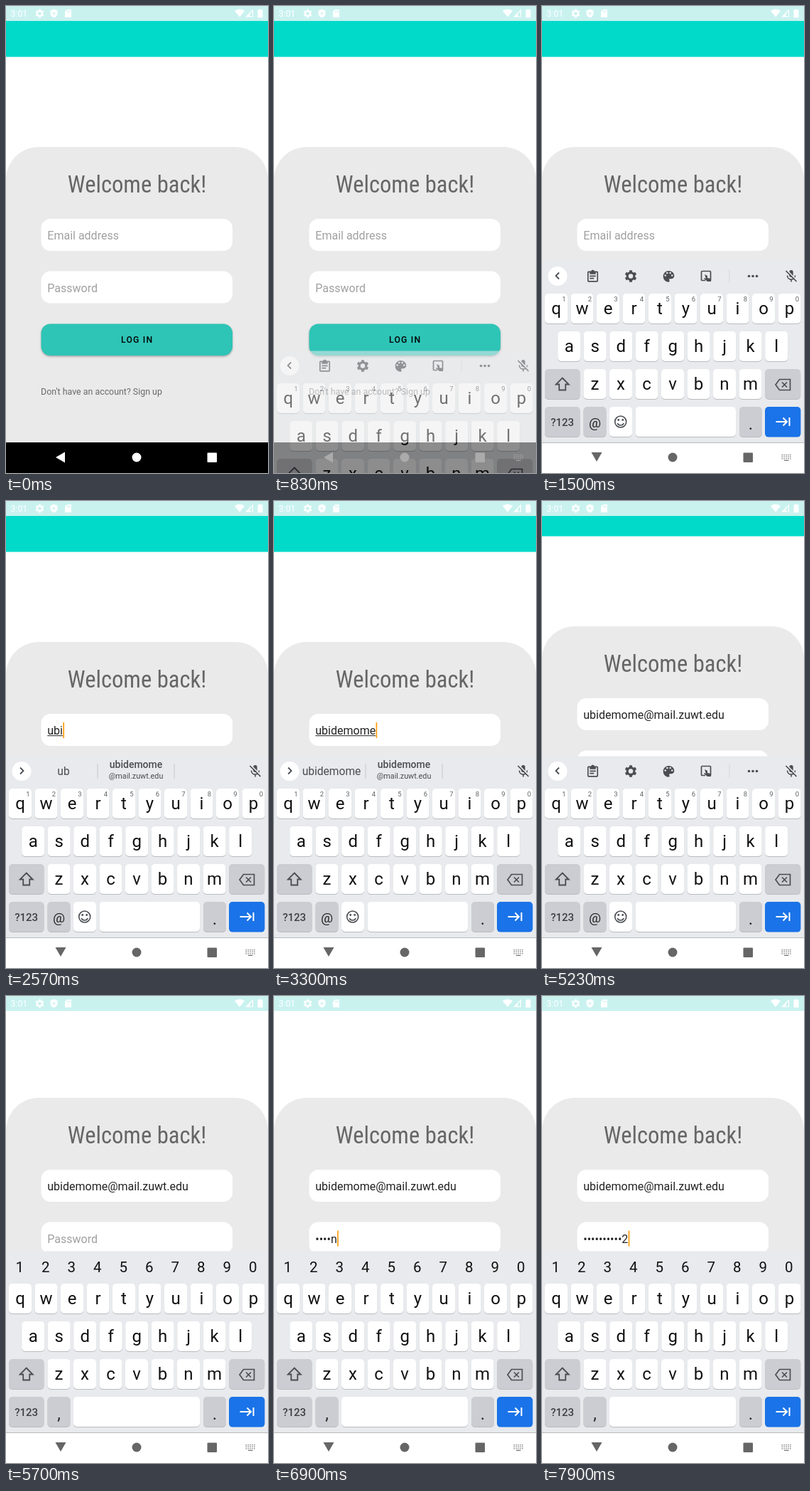
These frames come from a looping animation (369 by 656 pixels, 8 s). An HTML page with a canvas:

```html
<!DOCTYPE html>
<html lang="en">
<head>
<meta charset="utf-8">
<title>Login</title>
<style>
  html, body { margin: 0; width: 100%; height: 100%; overflow: hidden; background: #fff; }
  canvas { display: block; width: 369px; height: 656px; }
</style>
</head>
<body>
<canvas id="stage"></canvas>
<script>
const W = 369, H = 656, LOOP = 8000;
const USER = 'ubidemome', DOMAIN = '@mail.zuwt.edu', SECRET = 'habonedu582';
const SECRET_TIMES = [6370, 6500, 6570, 6700, 6900, 6970, 7170, 7300, 7630, 7770, 7900];
const SANS = 'Roboto, "Open Sans", sans-serif';
const INK = '#4a4d51', PITCH = 36.5;

const dpr = window.devicePixelRatio || 1;
const setup = canvas => {
  canvas.width = W * dpr;
  canvas.height = H * dpr;
  const g = canvas.getContext('2d');
  g.scale(dpr, dpr);
  return g;
};
const main = setup(document.getElementById('stage'));
const layer = setup(document.createElement('canvas'));
let c = main;

const clamp = x => Math.min(1, Math.max(0, x));
const within = (t, a, b) => t >= a && t < b;
const held = (t, start, step) => start + step * Math.floor((t - start) / step);

function box(x, y, w, h, r, fill) {
  c.beginPath();
  c.roundRect(x, y, w, h, r);
  c.fillStyle = fill;
  c.fill();
}
function disc(x, y, r, fill) {
  c.beginPath();
  c.arc(x, y, r, 0, 7);
  c.fillStyle = fill;
  c.fill();
}
function text(s, x, y, size, fill, align = 'left', weight = 400) {
  c.font = `${weight} ${size}px ${SANS}`;
  c.textAlign = align;
  c.fillStyle = fill;
  c.fillText(s, x, y);
}
function shape(d, x, y, scale, fill) {
  c.save();
  c.translate(x, y);
  c.scale(scale, scale);
  c.fillStyle = fill;
  c.fill(new Path2D(d), 'evenodd');
  c.restore();
}
function line(d, x, y, color, width = 1.8) {
  c.save();
  c.translate(x, y);
  c.strokeStyle = color;
  c.lineWidth = width;
  c.stroke(new Path2D(d));
  c.restore();
}
function gear(x, y, r, fill) {
  c.save();
  c.translate(x, y);
  c.strokeStyle = fill;
  c.lineWidth = r * .38;
  c.beginPath();
  c.arc(0, 0, r * .58, 0, 7);
  c.stroke();
  for (let i = 0; i < 6; i++) {
    c.rotate(Math.PI / 3);
    box(-r * .24, -r, r * .48, r * .36, r * .08, fill);
  }
  c.restore();
}

// Status bar

function statusBar() {
  c.fillStyle = '#c9f2ef';
  c.fillRect(0, 0, W, 21);
  text('3:01', 6.5, 15, 12.3, '#fff');
  gear(47.5, 10.5, 6, '#fff');
  shape('M0-6L5-4V0C5 3 3 5 0 6C-3 5-5 3-5 0V-4ZM0-2.6L.8-.8 2.6 0 .8.8 0 2.6-.8.8-2.6 0-.8-.8Z', 67.5, 10.5, 1, '#fff');
  shape('M-1.5-5.5H4.5V5.5H-4.5V-2.5ZM-1.5-3.8V-1.6H-.5V-3.8ZM.5-3.8V-1.6H1.5V-3.8ZM2.4-3.8V-1.6H3.4V-3.8Z', 87.5, 10.5, 1, '#fff');
  shape('M0 5.5L-7-3C-3-6.4 3-6.4 7-3Z', 329, 10, 1, '#fff');
  shape('M5-5.5V5.5H-6ZM3.8-2.6L.5.8V4.4H3.8Z', 343, 10, 1, '#fff');
  shape('M-1.5-6H1.5V-5H3.5V5.7H-3.5V-5H-1.5Z', 358, 10.5, 1, '#fff');
}

// Login form

function title() {
  const s = 'Welcome back!';
  const face = size => `condensed ${size}px "Roboto Condensed", Roboto, sans-serif`;
  c.font = face(34);
  const size = 34 * Math.min(1, 195.5 / c.measureText(s).width);
  c.font = face(size);
  c.textAlign = 'center';
  c.fillStyle = '#666';
  c.fillText(s, 184.5, 262);
}

function field(y, hint, value, caret, underline) {
  box(49.5, y, 269.5, 45, 13, '#fff');
  const base = y + 29, x = 58.3;
  text(value || hint, x, base, 16, value ? '#222' : '#a0a0a0');
  const w = value ? c.measureText(value).width : 0;
  if (underline) {
    c.fillStyle = '#222';
    c.fillRect(x, base + 1.2, w, 1);
  }
  if (caret) {
    c.fillStyle = '#ff9800';
    c.fillRect(x + w + .4, base - 17, 1.6, 22);
  }
}

function typedCount(t) {
  if (t < 1970) return 0;
  if (t < 2370) return 1;
  if (t < 2570) return 2;
  return Math.min(USER.length, 3 + Math.floor((t - 2570) / 110));
}

function form(t) {
  const pan = t < 5230 ? 0
    : Math.round(55 * (1 - (1 - clamp((held(t, 5230, 66) - 5173) / 250)) ** 2));
  c.save();
  c.translate(0, -pan);
  c.fillStyle = '#01dac9';
  c.fillRect(0, 0, W, 71.5);
  box(0, 198, W, 520, 46, '#eaeaea');
  title();

  const email = t < 4030 ? USER.slice(0, typedCount(t)) : USER + DOMAIN;
  const emailCaret = within(t, 970, 1500) || within(t, 1970, 3770) ||
    within(t, 3970, 4570) || within(t, 5030, 5230);
  field(299, 'Email address', email, emailCaret, within(t, 2170, 4030));

  const n = SECRET_TIMES.filter(at => t >= at).length;
  const secret = n ? '•'.repeat(n - 1) + SECRET[n - 1] : '';
  field(372.6, 'Password', secret, within(t, 5428, 5700) || t >= 6230);

  c.save();
  c.shadowColor = 'rgba(0,0,0,.3)';
  c.shadowBlur = 3 * dpr;
  c.shadowOffsetY = 1.5 * dpr;
  box(49.5, 446.4, 269.5, 44.6, 13, '#2ec4b6');
  c.restore();
  c.letterSpacing = '1.2px';
  text('LOG IN', 162, 473, 12.2, '#000', 'left', 500);
  c.letterSpacing = '0px';
  text("Don't have an account? Sign up", 49, 546, 12.4, '#696969');
  c.restore();
}

// Keyboard

function key(x, y, w, fill) {
  box(x, y + 1, w, 42, 5, '#b9bbbf');
  box(x, y, w, 42, 5, fill);
}

function letters(row, x, y) {
  [...row].forEach((ch, i) => {
    const mid = x + i * PITCH;
    key(mid - 16, y, 32, '#fff');
    text(ch, mid, y + 28.5, 24, '#111', 'center');
  });
}

function chevron(open) {
  disc(22, 379.5, 13.5, '#fff');
  line(open ? 'M-2-4.5L2.5 0L-2 4.5' : 'M2-4.5L-2.5 0L2 4.5', 22, 379, INK);
}

function micOff() {
  box(348.3, 371, 5.4, 10, 2.7, INK);
  line('M-5.5 0C-5.5 7.5 5.5 7.5 5.5 0M0 5.5V9', 351, 378.5, INK, 1.6);
  line('M-6.5-8.5L8.5 6.5', 351, 379.5, '#e8eaed', 1.8);
  line('M-7.5-7.5L7.5 7.5', 351, 379.5, INK, 1.7);
}

function tools() {
  chevron(false);
  shape('M7-8H3C2-11-2-11-3-8H-7C-8-8-9-7-9-6V8C-9 9-8 10-7 10H7C8 10 9 9 9 8V-6C9-7 8-8 7-8ZM-7-6H-5V-3H5V-6H7V8H-7ZM-5-1H5V1H-5ZM-5 3H2V5H-5Z',
    71.5, 379.3, .84, INK);
  gear(125, 379.5, 8.3, INK);
  shape('M12 3a9 9 0 0 0 0 18c.83 0 1.5-.67 1.5-1.5 0-.39-.15-.74-.39-1.01-.23-.26-.38-.61-.38-.99 0-.83.67-1.5 1.5-1.5H16a5 5 0 0 0 5-5c0-4.42-4.03-8-9-8z' +
    [[6.5, 10.5], [9.5, 6.5], [14.5, 6.5], [17.5, 10.5]]
      .map(([x, y]) => `M${x - 1.5} ${y}a1.5 1.5 0 1 0 3 0a1.5 1.5 0 1 0-3 0z`).join(''),
    168, 369.4, .87, INK);
  line('M-1 6.5H-5.5Q-6.5 6.5-6.5 5.5V-5.5Q-6.5-6.5-5.5-6.5H5.5Q6.5-6.5 6.5-5.5V6.5', 231, 379, INK, 1.7);
  shape('M-2-2L2 0V3L7 4V8H2L-3 4L-2 3L0 4Z', 231, 379, 1, INK);
  c.fillStyle = '#d3d5d9';
  c.fillRect(263.5, 370, 1, 19);
  for (const dx of [-5.5, 0, 5.5]) disc(297 + dx, 379.5, 1.8, INK);
  micOff();
}

function suggestions(t) {
  const n = typedCount(t - 66);
  chevron(true);
  if (t >= 3970) box(131, 361, 105, 38, 4, '#dadce0');
  text(USER.slice(0, n), 81, 385, 15.6, INK, 'center');
  c.fillStyle = '#c6c8cc';
  c.fillRect(128.5, 369, 1, 21);
  if (n > 1) {
    c.fillRect(236.5, 369, 1, 21);
    text(USER, 183, 374.5, 14, INK, 'center', 500);
    text(DOMAIN, 183, 390, 10.8, INK, 'center');
  }
  micOff();
}

function functionKeys(numeric) {
  const grey = '#cccdd2';
  key(4, 510, 49.5, grey);
  line('M0-9L9 0H4.5V8H-4.5V0H-9Z', 28.7, 531.5, INK);
  key(314.2, 510, 50, grey);
  line('M-5-7.5H10V7.5H-5L-10.5 0ZM-1.5-3.5L5.5 3.5M5.5-3.5L-1.5 3.5', 339.5, 532, INK, 1.7);

  key(4, 563, 49.5, grey);
  text('?123', 28.7, 590, 15, '#3c4043', 'center', 500);
  key(58.5, 563, 32, grey);
  if (numeric) {
    text(',', 74.5, 594.5, 23, '#222', 'center');
    key(95, 563, 178, '#fff');
  } else {
    text('@', 74.5, 592, 19, '#222', 'center');
    key(95, 563, 32, '#fff');
    line('M8 0A8 8 0 1 1-8 0A8 8 0 1 1 8 0M-4.5 2C-3 6 3 6 4.5 2', 110.7, 584, INK, 1.6);
    disc(107.7, 581.5, 1.4, INK);
    disc(113.7, 581.5, 1.4, INK);
    key(131.5, 563, 141.5, '#fff');
  }
  key(278, 563, 32, grey);
  text('.', 294, 594.5, 24, '#222', 'center');
  box(314, 563, 50.4, 42.6, 5, '#1a73e8');
  line('M-10 0H5M0-5.5L5.5 0L0 5.5M9-6V6', 339.5, 584, '#fff', 2);
}

function keyboard(t) {
  const numeric = t >= 5296;
  c.fillStyle = '#e8eaed';
  c.fillRect(0, 358.5, W, 255);
  c.fillStyle = '#fff';
  c.fillRect(0, 613.5, W, 43);

  letters('qwertyuiop', 20, 404);
  letters('asdfghjkl', 38.2, 457);
  letters('zxcvbnm', 74.5, 510);
  [...'1234567890'].forEach((d, i) => {
    const x = 20 + i * PITCH;
    if (numeric) text(d, x - .8, 387.5, 20.5, '#111', 'center');
    else text(d, x + 11, 415, 9.5, '#5f6368', 'center');
  });
  functionKeys(numeric);
  if (numeric) return;
  if (within(t, 2170, 4100)) suggestions(t);
  else tools();
}

// Navigation bar

function navIcons(t, shown) {
  const v = Math.round(255 - 153 * shown), tint = `rgb(${v},${v},${v})`;
  const turn = t < 830 ? 0 : clamp((held(t, 830, 65) - 830) / 130);
  c.save();
  c.translate(77, 634 - turn);
  c.rotate(-turn * Math.PI / 2);
  shape('M-7 0L6-7.5V7.5Z', 0, 0, 1, tint);
  c.restore();
  disc(184, 634, 6.5, tint);
  box(283.5, 627.5, 13.5, 13.5, 1, tint);
  if (t < 500) return;
  c.fillStyle = tint;
  for (let row = 0; row < 3; row++)
    for (let i = 0; i < 5; i++)
      c.fillRect(337.6 + i * 2.9, 630 + row * 2.6, 1.3, 1.3);
  c.fillRect(341, 637.8, 6.5, 1.1);
}

function draw(t) {
  const shown = t < 700 ? 0 : clamp((held(t, 700, 65) - 664.5) / 300);
  const rise = shown * shown * (3 - 2 * shown);

  c.fillStyle = '#fff';
  c.fillRect(0, 0, W, H);
  form(t);
  statusBar();
  c.fillStyle = '#000';
  c.fillRect(0, 613, W, 43);

  if (shown > 0) {
    c = layer;
    c.clearRect(0, 0, W, H);
    keyboard(t);
    c = main;
    c.globalAlpha = shown;
    c.drawImage(layer.canvas, 0, Math.round(298 * (1 - rise)), W, H);
    c.globalAlpha = 1;
  }
  navIcons(t, shown);
}

function tick() {
  draw(performance.now() % LOOP);
  requestAnimationFrame(tick);
}
tick();
</script>
</body>
</html>
```
